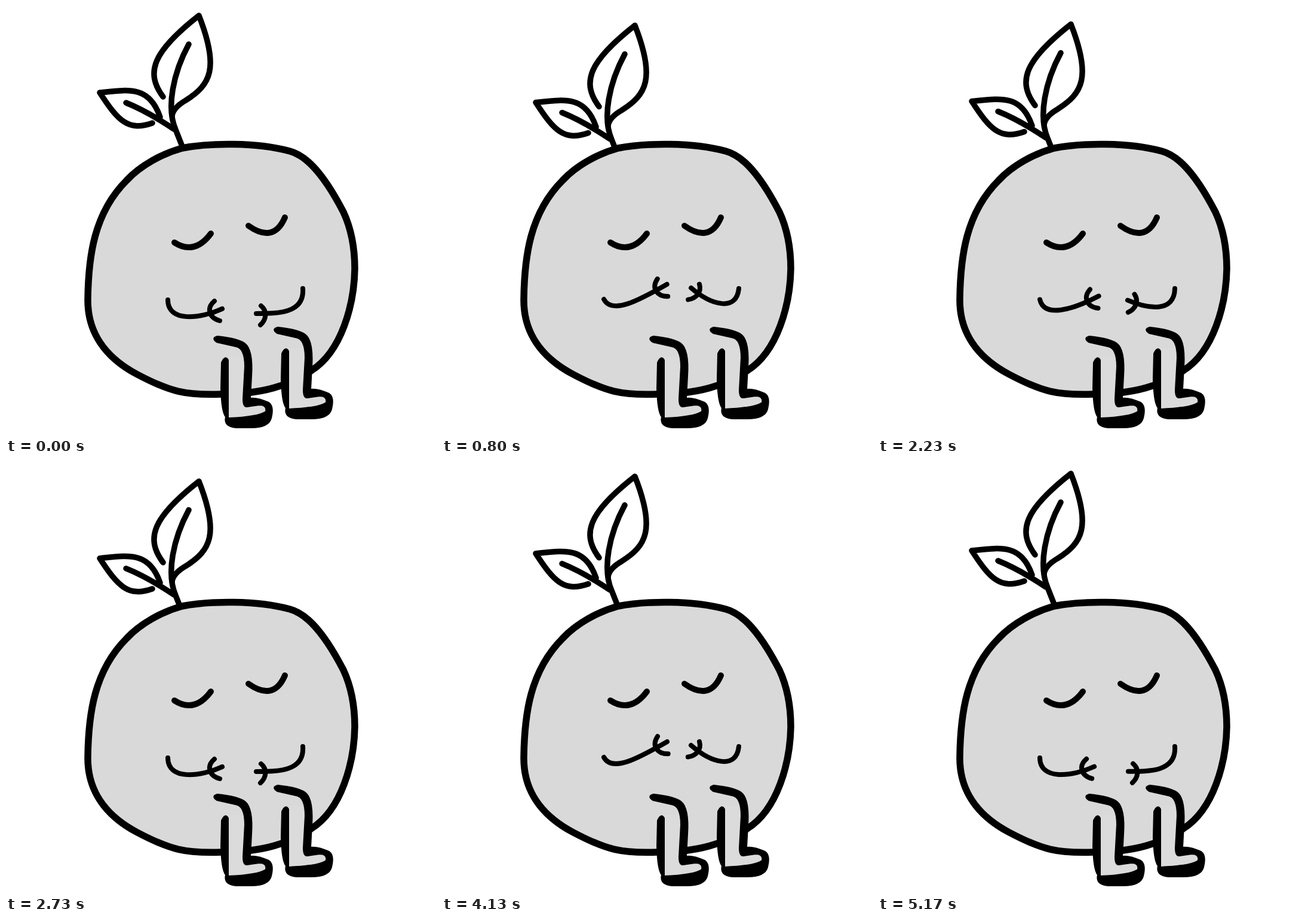
An HTML page that plays this animation: 720 by 720 pixels, repeating every 5210 ms.

```html
<!DOCTYPE html>
<html lang="en">
<head>
<meta charset="utf-8">
<title>Breathing sprout</title>
<style>
  html, body { margin: 0; width: 100%; height: 100%; overflow: hidden; background: #fff; }
  svg { display: block; width: 100vw; height: 100vh; }
  .line { fill: none; stroke: #000; stroke-linecap: round; stroke-linejoin: round; }
</style>
</head>
<body>
<svg viewBox="0 0 720 720">
  <defs>
    <g id="leg">
      <path fill="#dbdbdb" d="M366 588H402V665L436 670V685L370 692Z"/>
      <path stroke="#000" stroke-width="2" stroke-linejoin="round" d="M361 597Q367 584 372 593L372 690
        Q422 688 435 679Q437 668 424 668L403 671Q397 671 397 658
        L400 604Q400 572 384 570L353 563Q343 556 354 553
        Q390 557 400 565Q414 576 411 620L409 657
        Q420 655 440 664Q449 670 444 690Q440 706 410 706H385
        Q364 704 368 688Q361 680 360 640Z"/>
    </g>
  </defs>

  <g id="sprout" class="line" stroke-width="9.5">
    <path d="M263 152C233 112 245 77 323 16C358 105 342 132 301 158Q280 170 278 184"/>
    <path d="M306 64C280 112 268 170 284 207L301 250"/>
    <path d="M245 196C205 210 188 193 157 145C205 140 240 133 258 186"/>
    <path d="M201 162Q236 176 281 206"/>
  </g>

  <path class="line" stroke-width="11.5" style="fill:#d9d9d9" d="M295 238C340 229 420 228 475 243
    C510 252 540 297 565 345C578 373 584 408 584 440C583 500 562 578 512 610
    C475 635 430 650 360 650C300 652 275 646 220 617C165 588 136 545 137 490
    C138 420 147 347 202 292C225 267 262 247 295 238Z"/>

  <g class="line" stroke-width="10">
    <path d="M282 396C302 409 323 408 343 381"/>
    <path d="M406 368C430 385 453 387 467 354"/>
  </g>

  <g class="line" stroke-width="8">
    <path id="armL"/>
    <path id="handL" d="M-13 -13C-27 -1 -22 15 -4 20"/>
    <path id="armR"/>
    <path id="handR" d="M8 -13C19 -4 17 10 7 19"/>
  </g>

  <use href="#leg"/>
  <use href="#leg" x="101" y="-15"/>
</svg>
<script>
const LOOP = 5210;
const BREATH = LOOP / 2;
const $ = id => document.getElementById(id);

function ease(t, from, to) {
  const k = Math.max(0, Math.min(1, (t - from) / (to - from)));
  return (1 - Math.cos(Math.PI * k)) / 2;
}

// Bend an arm between two Bezier poses; the hand rides on its tip and turns
function bend(side, rest, up, turn, k) {
  const p = rest.map((v, i) => v + (up[i] - v) * k);
  const [x, y] = p.slice(-2);
  $("arm" + side).setAttribute("d", `M${p.slice(0, 2)}C${p.slice(2)}`);
  $("hand" + side).setAttribute("transform", `translate(${x} ${y}) rotate(${turn * k})`);
}

function draw(t) {
  // Quick dip, slow recovery, then a faster rise
  const dip = 16.5 * ease(t, 0, 640) - 6 * ease(t, 1100, 4000) - 10.5 * ease(t, 3450, 4750);
  $("sprout").setAttribute("transform", `translate(0 ${dip})`);

  const b = t % BREATH;
  const lift = ease(b, 150, 870) - ease(b, 1865, BREATH);
  bend("L", [271, 492, 271, 530, 325, 524, 362, 507], [271, 491, 285, 517, 330, 492, 377, 465], -16, lift);
  bend("R", [497, 473, 500, 515, 455, 515, 419, 515], [497, 473, 493, 513, 450, 500, 417, 471], 35, lift);
}

const start = performance.now();
function tick() {
  draw((performance.now() - start) % LOOP);
  requestAnimationFrame(tick);
}
draw(0);
requestAnimationFrame(tick);
</script>
</body>
</html>
```
